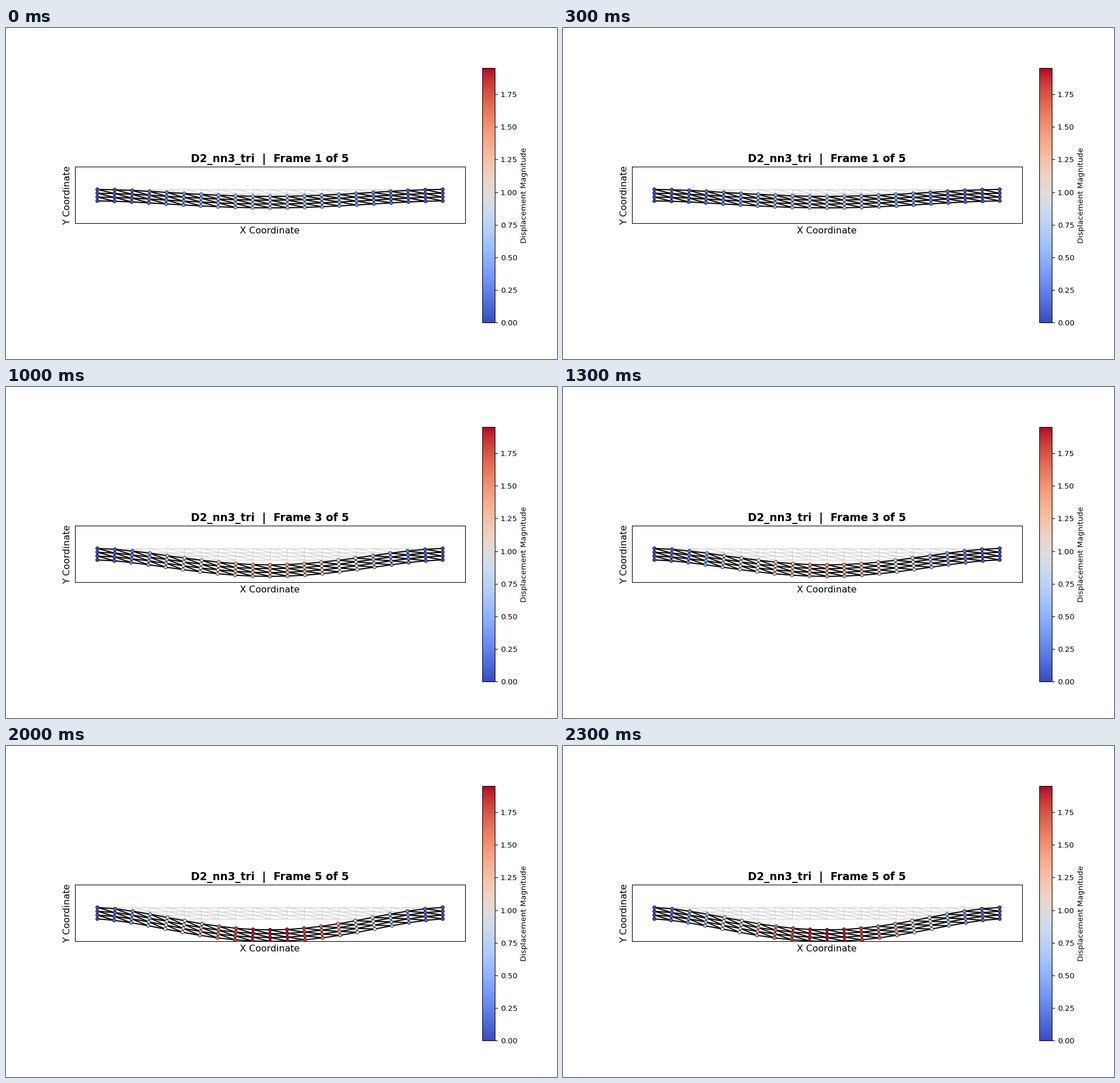
Write a matplotlib script that moves like this. It is 966 by 580 pixels and loops after 2.5 s.

```python
import numpy as np
import matplotlib.pyplot as plt
from matplotlib.animation import FuncAnimation
from matplotlib.collections import LineCollection

DPI = 96.6
NX, NY = 20, 3            # cells along and across the beam
LENGTH, HEIGHT = 30.0, 1.0
PEAKS = [0.605, 1.07, 1.43, 1.716, 1.953]   # midspan sag per load step
LIMIT = PEAKS[-1]

plt.rcParams["font.family"] = "DejaVu Sans"

gx, gy = np.meshgrid(np.linspace(0, LENGTH, NX + 1),
                     np.linspace(0, HEIGHT, NY + 1))
nodes = np.column_stack([gx.ravel(), gy.ravel()])


def mesh_edges():
    """Edges of a grid whose cells are split by a falling diagonal."""
    ids = np.arange(len(nodes)).reshape(NY + 1, NX + 1)
    pairs = [(ids[:, :-1], ids[:, 1:]),
             (ids[:-1], ids[1:]),
             (ids[1:, :-1], ids[:-1, 1:])]
    return np.vstack([np.column_stack([a.ravel(), b.ravel()])
                      for a, b in pairs])


def displacement(step):
    """Clamped beam sag with a growing membrane share, plus section rotation."""
    s = nodes[:, 0] / LENGTH
    share = 0.09 + 0.02 * step
    bending = 16 * (s * (1 - s)) ** 2
    membrane = 4 * s * (1 - s)
    sag = PEAKS[step] * ((1 - share) * bending + share * membrane)
    slope = PEAKS[step] * 32 * s * (1 - s) * (1 - 2 * s) / LENGTH
    return np.column_stack([slope * (nodes[:, 1] - HEIGHT / 2), -sag])


edges = mesh_edges()

fig, ax = plt.subplots(figsize=(10, 580 / DPI), dpi=DPI)
ax.set_aspect("equal")
ax.set_xlim(-LIMIT, LENGTH + LIMIT)
ax.set_ylim(-LIMIT, HEIGHT + LIMIT)
ax.set_xticks([])
ax.set_yticks([])
ax.set_xlabel("X Coordinate", fontsize=12)
ax.set_ylabel("Y Coordinate", fontsize=12)
title = ax.set_title("", fontsize=14, fontweight="bold")

ax.add_collection(LineCollection(nodes[edges], colors="lightgray",
                                 linewidths=1, zorder=1), autolim=False)
beam = LineCollection([], colors="black", linewidths=1.5,
                      capstyle="projecting", zorder=2)
ax.add_collection(beam, autolim=False)
dots = ax.scatter(nodes[:, 0], nodes[:, 1], c=np.zeros(len(nodes)), s=20,
                  cmap="coolwarm", vmin=0, vmax=LIMIT,
                  edgecolors="black", linewidths=0.5, zorder=3)
fig.colorbar(dots, ax=ax, fraction=0.046, pad=0.04,
             label="Displacement Magnitude")


def update(step):
    shift = displacement(step)
    moved = nodes + shift
    beam.set_segments(moved[edges])
    dots.set_offsets(moved)
    dots.set_array(np.hypot(shift[:, 0], shift[:, 1]))
    title.set_text(f"D2_nn3_tri  |  Frame {step + 1} of {len(PEAKS)}")
    return beam, dots, title


anim = FuncAnimation(fig, update, frames=len(PEAKS), interval=500,
                     repeat=True, repeat_delay=0)
plt.show()
```
